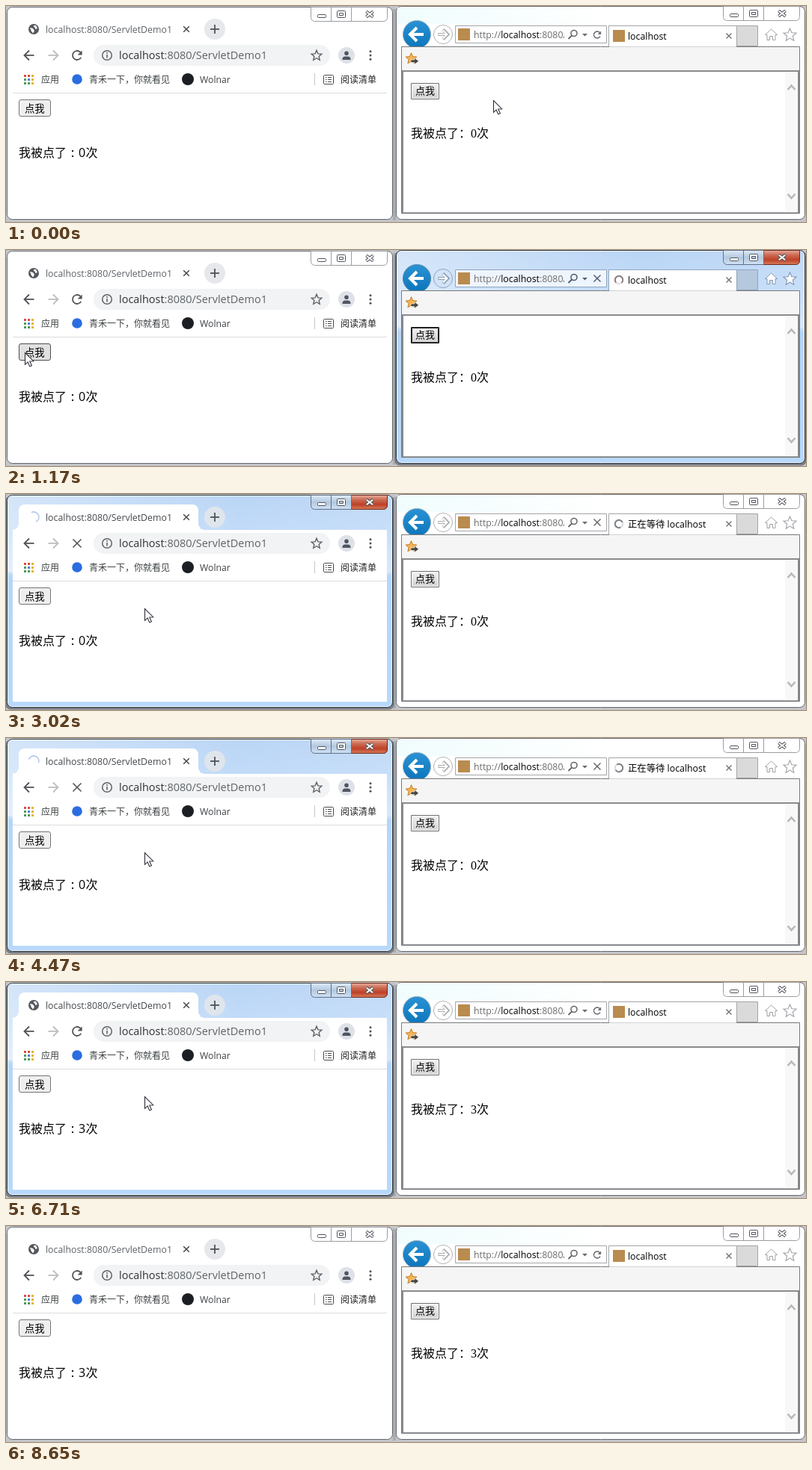
Write an HTML page with a canvas that moves like this. It is 1069x289 px and loops after 8.73 s.

```html
<!DOCTYPE html>
<html lang="zh-CN">
<head>
<meta charset="utf-8">
<style>
html, body { margin: 0; width: 100%; height: 100%; overflow: hidden; background: #c3c5c8; }
canvas { display: block; }
</style>
</head>
<body>
<canvas id="stage" width="1069" height="289"></canvas>
<script>
const c = document.getElementById('stage').getContext('2d');
const LOOP = 8730, STEP = 78.1;
const UI = '"Open Sans", "Noto Sans CJK SC", "Noto Sans CJK", sans-serif';
const CJK = '"Noto Sans CJK SC", "Noto Sans CJK", sans-serif';
const SERIF = '"Liberation Serif", serif';
const TAU = Math.PI * 2, SMALL = 12.35;

// Pointer path: step, x, y
const PATH = [
  [0, 651, 126], [3, 612, 114], [6, 578, 108], [8, 578, 108], [9, 540, 110],
  [10, 380, 122], [11, 170, 132], [12, 31, 135], [15, 25, 137], [19, 27, 138],
  [22, 45, 140], [24, 70, 142], [29, 185, 153], [99, 185, 153], [100, 230, 160],
  [102, 480, 190], [104, 840, 240], [105, 990, 268]
];

function text(s, x, y, size, color = '#000', font = UI, weight = 400) {
  c.font = `${weight} ${size}px ${font}`;
  c.fillStyle = color;
  c.fillText(s, x, y);
  return x + c.measureText(s).width;
}
function box(x, y, w, h, fill, stroke, r = 0, width = 1) {
  c.beginPath();
  c.roundRect(x, y, w, h, r);
  if (fill) { c.fillStyle = fill; c.fill(); }
  if (stroke) { c.strokeStyle = stroke; c.lineWidth = width; c.stroke(); }
}
function disc(x, y, r, fill, stroke, width = 1) {
  c.beginPath();
  c.arc(x, y, r, 0, TAU);
  if (fill) { c.fillStyle = fill; c.fill(); }
  if (stroke) { c.strokeStyle = stroke; c.lineWidth = width; c.stroke(); }
}
function arc(x, y, r, from, to, color, width) {
  c.beginPath();
  c.arc(x, y, r, from, to);
  c.strokeStyle = color;
  c.lineWidth = width;
  c.stroke();
}
function trace(pts, closed) {
  c.beginPath();
  for (let i = 0; i < pts.length; i += 2) c.lineTo(pts[i], pts[i + 1]);
  if (closed) c.closePath();
}
function line(pts, color, width = 1) {
  trace(pts);
  c.strokeStyle = color;
  c.lineWidth = width;
  c.stroke();
}
function poly(pts, fill, stroke, width = 1) {
  trace(pts, true);
  if (fill) { c.fillStyle = fill; c.fill(); }
  if (stroke) { c.strokeStyle = stroke; c.lineWidth = width; c.stroke(); }
}
function cross(x, y, rx, ry, color, width) {
  line([x - rx, y - ry, x + rx, y + ry], color, width);
  line([x - rx, y + ry, x + rx, y - ry], color, width);
}
function star(x, y, r, fill, stroke, width) {
  const pts = [];
  for (let i = 0; i < 10; i++) {
    const a = i * TAU / 10 - TAU / 4, d = i % 2 ? r * 0.45 : r;
    pts.push(x + d * Math.cos(a), y + d * Math.sin(a));
  }
  poly(pts, fill, stroke, width);
}
function ramp(y0, y1, ...colors) {
  const g = c.createLinearGradient(0, y0, 0, y1);
  colors.forEach((col, i) => g.addColorStop(i / (colors.length - 1), col));
  return g;
}
function arrow(x, y, dir, r, color, width) {
  line([x - dir * r, y, x + dir * r, y], color, width);
  line([x, y - r, x + dir * r, y, x, y + r], color, width);
}
function reload(x, y, r, color, width) {
  arc(x, y, r, 0.5, TAU - 0.75, color, width);
  poly([x + r + 0.6, y - r - 0.6, x + r + 0.6, y - 0.4, x + 0.6, y - 0.4], color);
}

function frame(x, y, w, h, active) {
  if (active) {
    box(x - 2, y + 1, w + 4, h + 2, 'rgba(50,56,66,.5)', null, 7);
    const g = c.createLinearGradient(0, 0, 0, 289);
    [[0, '#b2d0f4'], [0.17, '#bad7f8'], [0.36, '#cfe3fa'], [0.38, '#b5d6fa'], [1, '#b8d9fc']]
      .forEach(s => g.addColorStop(...s));
    box(x, y, w, h, g, null, 7);
    const shine = c.createLinearGradient(x, 0, x + w, 0);
    shine.addColorStop(0, 'rgba(255,255,255,.45)');
    shine.addColorStop(0.6, 'rgba(255,255,255,.1)');
    shine.addColorStop(1, 'rgba(255,255,255,.2)');
    box(x, y, w, 104, shine, null, 7);
    box(x + 1, y + 1, w - 2, h - 2, null, 'rgba(255,255,255,.75)', 6);
    box(x, y, w, h, null, '#2c3540', 7);
  } else {
    box(x, y, w, h, '#fff', '#63686f', 7);
  }
}

function caption(x, y, active) {
  const edge = active ? '#5f7187' : '#9a9da1';
  const h = 19;
  box(x, y, 102, h, active ? ramp(y, y + h, '#dfebf8', '#b3c8df', '#cfe1f4') : '#fff', edge, [0, 0, 5, 5]);
  if (active) box(x + 54, y, 48, h, ramp(y, y + h, '#e6ab9c', '#cc6a52', '#bd4128', '#d77c5c'), '#6d2a20', [0, 0, 5, 0]);
  line([x + 27, y, x + 27, y + h], edge);
  line([x + 54, y, x + 54, y + h], edge);
  const ink = '#50565e';
  box(x + 9, y + 10, 11, 4, '#fff', ink, 1);
  box(x + 35, y + 5, 11, 9, '#fff', ink, 1);
  box(x + 38, y + 8, 5, 3, active ? '#b8cce2' : '#fff', ink);
  cross(x + 78.5, y + 9.5, 4.6, 3.6, ink, 4);
  cross(x + 78.5, y + 9.5, 4.2, 3.3, '#fff', 2);
}

function globe(x, y) {
  disc(x, y, 7, '#55595e');
  poly([x - 5, y - 2, x - 1, y - 1, x + 1, y + 2, x - 1, y + 5.5, x - 3, y + 3], '#fff');
  poly([x, y - 5, x + 3, y - 5, x + 5, y - 1, x + 2, y, x + 2, y - 2, x, y - 3], '#fff');
}

function leftWindow(s) {
  frame(1.5, 1.5, 515, 284, s.leftActive);
  caption(407.5, 1.5, s.leftActive);
  box(9, 48, 500, 230, '#fff');
  if (s.leftActive) {
    box(17, 14, 240, 36, '#fff', null, [8, 8, 0, 0]);
    poly([9, 48, 14, 46.5, 17, 41, 17, 48], '#fff');
    poly([265, 48, 260, 46.5, 257, 41, 257, 48], '#fff');
  }

  if (s.leftBusy) {
    // Sweeps counter-clockwise, growing to half a turn
    const head = (s.t - 1540) / 1320 * TAU;
    arc(37, 31, 7, -TAU / 4 - head, -TAU / 4 - Math.max(head - TAU / 2, 0), '#b9cdee', 1.8);
    cross(95, 66, 5.5, 5.5, '#505458', 1.6);
  } else {
    globe(37, 31);
    reload(95, 66, 6, '#505458', 1.8);
  }
  text('localhost:8080/ServletDemo1', 53, 35.5, SMALL, s.leftActive ? '#45494d' : '#5f6368');
  cross(241, 31, 3.8, 3.8, '#45494d', 1.5);
  disc(279, 31, 14, s.leftActive ? '#dfe5ec' : '#e6e8eb');
  line([273, 31, 285, 31], '#505458', 1.8);
  line([279, 25, 279, 37], '#505458', 1.8);

  arrow(31, 66, -1, 6.5, '#505458', 1.8);
  arrow(63, 66, 1, 6.5, '#bcbec1', 1.8);
  box(117, 52, 316, 28, '#f1f3f4', null, 14);
  disc(135, 66, 6.3, null, '#5f6368', 1.5);
  box(134.2, 65, 1.6, 4.5, '#5f6368');
  box(134.2, 62, 1.6, 1.7, '#5f6368');
  const end = text('localhost', 151, 71, 14.46, '#303236');
  text(':8080/ServletDemo1', end, 71, 14.46, '#5f6368');
  star(415, 66.5, 7.2, null, '#5f6368', 1.4);
  disc(455, 66, 11, '#dfe1e8');
  disc(455, 63.2, 2.8, '#4f5661');
  box(449.5, 67.5, 11, 4.5, '#4f5661', null, [4, 4, 0, 0]);
  for (let i = -1; i < 2; i++) disc(487, 66 + i * 5.2, 1.5, '#505458');

  const dots = ['#d95040', '#d95040', '#e8b23a', '#4d9a58', '#4b7fe0', '#e8b23a', '#4d9a58', '#4d9a58', '#e8b23a'];
  dots.forEach((col, i) => box(24 + i % 3 * 5, 92 + Math.floor(i / 3) * 5, 3, 3, col));
  text('应用', 47, 103, 12, '#3c4043', CJK);
  disc(95, 98, 6.8, '#2b6de0');
  text('青禾一下，你就看见', 111, 103, 12, '#3c4043', CJK);
  disc(243, 98, 8, '#1b1f23');
  text('Wolnar', 259, 103, 12.2, '#3c4043');
  line([412.5, 90, 412.5, 106], '#c4c7cb');
  box(424.5, 92.5, 13, 12, null, '#45494d', 1);
  for (let y = 95; y < 103; y += 3) {
    box(427, y, 1.6, 1, '#45494d');
    box(430, y, 5, 1, '#45494d');
  }
  text('阅读清单', 447, 103, 12, '#202124', CJK);
  line([9, 116.5, 509, 116.5], '#dadce0');

  box(17.5, 125.5, 42, 22, s.leftHover ? '#e0e0e0' : '#efefef', s.leftHover ? '#4f4f4f' : '#767676', 2.5);
  text('点我', 25, 142, 13.33, '#000', CJK);
  text('我被点了', 17, 202, 16, '#000', CJK);
  box(88, 193, 2, 2, '#000');
  box(88, 200, 2, 2, '#000');
  text(s.leftCount, 97, 202, 16, '#000', UI);
  text('次', 106.5, 202, 16, '#000', CJK);
}

function rightWindow(s) {
  const on = s.rightActive;
  const edge = on ? '#8fa5bd' : '#a3a5a8';
  frame(521.5, 0.5, 546, 285, on);
  if (!on) {
    const tint = c.createLinearGradient(522, 0, 800, 0);
    tint.addColorStop(0, '#f0fcfd');
    tint.addColorStop(1, '#fff');
    box(523, 2, 434, 22, tint);
  }
  caption(958.5, 0.5, on);

  box(600.5, 26.5, 202, 23, on ? '#eff5fc' : '#fff', edge);
  disc(584, 38, 12.5, on ? '#d3e4f7' : '#fff', on ? '#8da2ba' : '#b0b2b5');
  disc(549, 38, 18.6, ramp(20, 56, '#2a92d3', '#0d76bb'), on ? '#5f8bb0' : '#9db4c4');
  arrow(549, 38, -1, 9, '#fff', 4);
  arrow(584, 38, 1, 6.5, on ? '#8b9eb4' : '#aaacaf', 4);
  arrow(584, 38, 1, 5.5, '#fff', 2);

  box(604, 30, 16, 16, '#b98b4e');
  c.save();
  c.beginPath();
  c.rect(604, 27, 142, 22);
  c.clip();
  let x = text('http://', 625, 43, SMALL, '#6d6d6d');
  x = text('localhost', x, 43, SMALL, '#000');
  text(':8080/', x, 43, SMALL, '#6d6d6d');
  c.restore();
  const tool = on ? '#4d5e72' : '#66696d';
  disc(759, 36.5, 4, null, tool, 1.6);
  line([756, 39.5, 751.5, 44], tool, 2);
  poly([770, 37, 777, 37, 773.5, 40.5], tool);
  if (s.rightBusy) cross(790, 38, 4.5, 4.5, tool, 1.5);
  else reload(790, 38.5, 4.5, tool, 1.5);

  box(805.5, 26.5, 171, 28, '#fff', edge);
  if (s.rightBusy) {
    const a = (s.t - 620) / 1000 * TAU;
    disc(819, 40, 5.2, null, '#dcdcde', 2);
    arc(819, 40, 5.2, a - 1, a + 3.7, on ? '#8d7d80' : '#7f8387', 2);
  } else {
    box(811, 32, 16, 16, '#b98b4e');
  }
  text(s.waiting ? '正在等待 localhost' : 'localhost', 831, 45, SMALL, '#000');
  cross(966, 40, 3.5, 3.5, '#77797c', 1.5);
  box(976.5, 26.5, 28, 27, on ? '#b5c8dd' : '#dadada', edge);
  const glyph = on ? '#8297af' : '#9fa2a6';
  poly([1014.5, 38.5, 1022.5, 31, 1030.5, 38.5, 1028, 38.5, 1028, 45.5, 1024.5, 45.5,
    1024.5, 40.5, 1020.5, 40.5, 1020.5, 45.5, 1017, 45.5, 1017, 38.5], '#fff', glyph);
  star(1047.5, 39, 9, '#fff', glyph, 1.1);

  box(528.5, 54.5, 532, 223, '#fff', '#777a7e');
  box(529, 55, 531, 31, '#f5f5f5');
  line([806, 54.5, 976, 54.5], '#cfd2d5');
  star(541.5, 70.5, 7.8, '#f5b653', '#c77c23', 1);
  poly([541, 72, 546, 72, 546, 69.5, 551.5, 73.8, 546, 78, 546, 75.5, 541, 75.5], '#444', '#fff', 0.6);
  box(530, 87, 529, 190, '#fff', '#888a8d', 0, 2);
  box(1041, 89, 16, 186, '#f8f8f8');
  line([1044.5, 112, 1049.5, 106.5, 1054.5, 112], '#b7b9bb', 2.6);
  line([1044.5, 251.5, 1049.5, 257, 1054.5, 251.5], '#b7b9bb', 2.6);

  if (s.rightHover) {
    box(541.5, 103.5, 37, 21, ramp(104, 125, '#c4f0fd', '#9aeafb'), '#3c8fb5');
  } else {
    box(541.5, 103.5, 37, 21, ramp(104, 125, '#f1f1f1', '#d2d2d2'), on ? '#111' : '#707070');
    box(542.5, 104.5, 35, 19, null, on ? '#333' : '#f8f8f8');
  }
  text('点我', 547, 117.5, 13, '#000', CJK, 300);
  text('我被点了：', 541, 176, 16, '#000', CJK, 300);
  text(s.rightCount, 621, 176, 16, '#000', SERIF);
  text('次', 629, 176, 16, '#000', CJK, 300);

  if (s.rightHover) {
    box(537, 254, 218, 21, 'rgba(70,70,70,.4)', null, 2);
    box(534.5, 251.5, 217, 20, ramp(252, 272, '#fff', '#e5e8f1'), '#6f7276', 2);
    text('http://localhost:8080/ServletDemo1', 540, 266, SMALL, '#575757');
  }
}

function pointer(k) {
  let i = 1;
  while (i < PATH.length - 1 && PATH[i][0] < k) i++;
  const [k0, x0, y0] = PATH[i - 1], [k1, x1, y1] = PATH[i];
  const u = Math.min(1, (k - k0) / (k1 - k0));
  return [Math.round(x0 + (x1 - x0) * u), Math.round(y0 + (y1 - y0) * u)];
}
function drawPointer(x, y) {
  c.save();
  c.translate(x + 0.5, y + 0.5);
  poly([0, 0, 0, 15.8, 3.6, 12.4, 6.3, 18.4, 8.9, 17.3, 6.3, 11.5, 11.2, 11.2], '#fff', '#2e3138', 1.1);
  c.restore();
}

function draw(t) {
  const k = Math.floor((t + 20) / STEP);
  const during = (from, to) => k >= from && k < to;
  const [x, y] = pointer(k);
  const over = (bx, by, w, h) => x >= bx && x < bx + w && y >= by && y < by + h;
  const s = {
    t: k * STEP - 10,
    leftActive: during(18, 111),
    rightActive: during(6, 18),
    leftBusy: during(20, 85),
    rightBusy: during(8, 73),
    waiting: during(33, 72),
    leftHover: over(17, 125, 43, 23),
    rightHover: over(541, 103, 38, 22),
    leftCount: k < 85 ? '0' : '3',
    rightCount: k < 73 ? '0' : '3'
  };
  box(0, 0, 1069, 289, '#c3c5c8');
  box(517, 4, 4, 283, '#a9acb0');
  if (s.leftActive) { rightWindow(s); leftWindow(s); }
  else { leftWindow(s); rightWindow(s); }
  if (during(6, 8) || during(18, 20)) disc(x, y + 1, 12.5, 'rgba(253,238,50,.7)');
  if (k < 106) drawPointer(x, y);
}

function tick(now) {
  draw(now % LOOP);
  requestAnimationFrame(tick);
}
draw(0);
requestAnimationFrame(tick);
</script>
</body>
</html>
```
